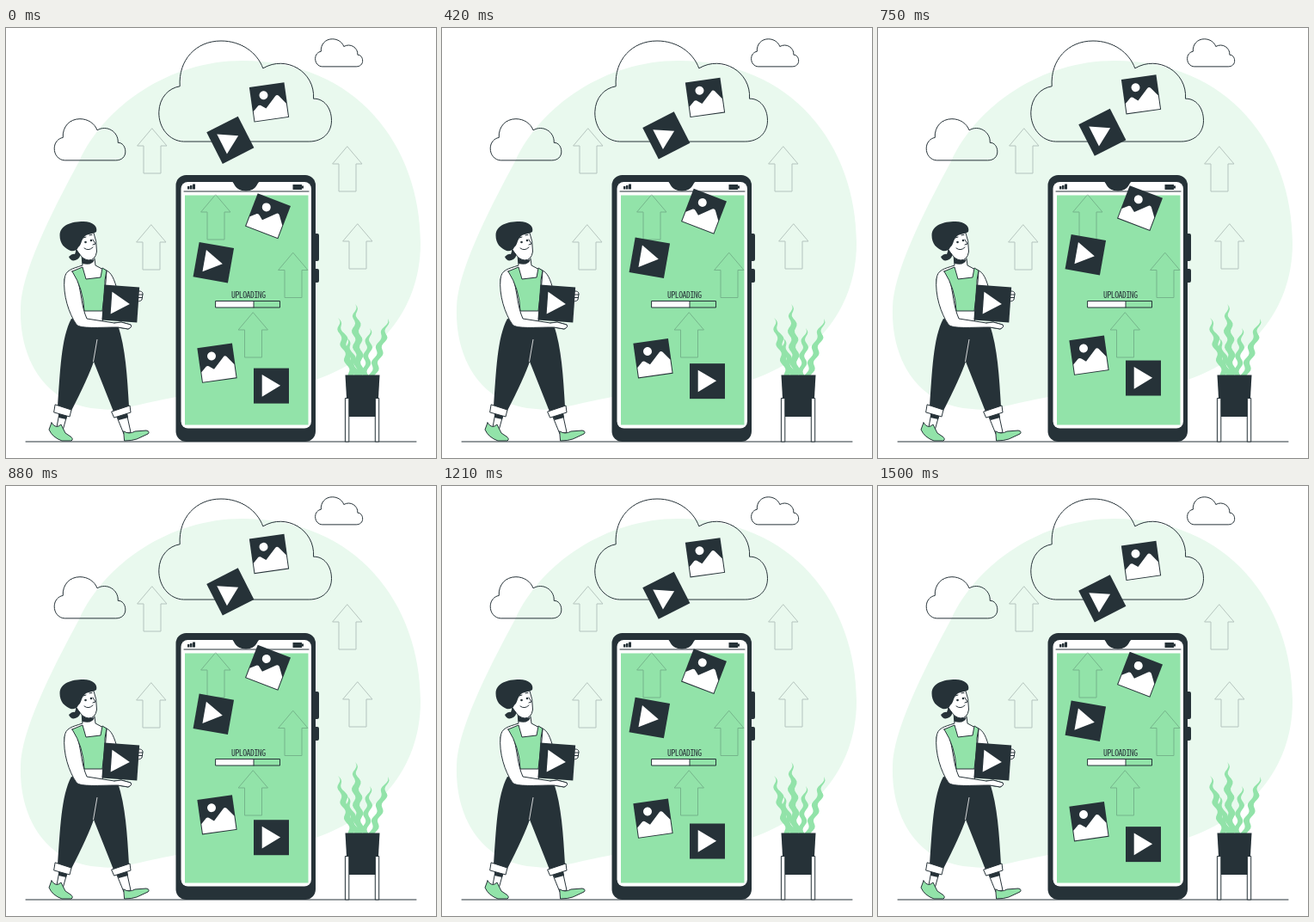
An HTML page that plays this animation: 500 by 500 pixels, repeating every 1540 ms.

```html
<!DOCTYPE html>
<html lang="en">
<head>
<meta charset="utf-8">
<title>Uploading</title>
<style>
  html, body { margin: 0; width: 100%; height: 100%; overflow: hidden; background: #fff; }
  svg { display: block; width: 100vw; height: 100vh; }
  .dark { fill: #263238; }
  .green { fill: #92e3a9; }
  .white { fill: #fff; }
  .line { stroke: #263238; stroke-linejoin: round; stroke-linecap: round; }
  .open { fill: none; }
  #cloud { vector-effect: non-scaling-stroke; }
  .label { font: 9.6px "Noto Sans Mono CJK JP", "Liberation Mono", monospace; letter-spacing: -.4px; }
</style>
</head>
<body>
<svg viewBox="0 0 500 500">
  <defs>
    <path id="cloud" d="M29 117.5C13 117 0 102 .5 83C1 66 12 55 25 53C23 22 44 0 73 0C96 0 115 13 122 32C149 16 183 36 181 67.500C193 67 202 78 202 93C202 107 192 117.5 176 117.5Z"/>
    <path id="arrow" d="M0 0L17 20H10V52H-10V20H-17Z"/>
    <g id="video">
      <rect class="dark" x="-20.5" y="-20.5" width="41" height="41"/>
      <path class="white" d="M-10.8-13V12.7L10.6-.3Z"/>
    </g>
    <g id="photo">
      <rect class="dark" x="-20.5" y="-20.5" width="41" height="41"/>
      <circle class="white" cx="-5.3" cy="-9" r="5"/>
      <path class="white" d="M-19.5 8L-13 2Q-11 1-9 3L-4.5 6.5L8-6Q10-8 12-6L19.5 4V19.5H-19.5Z"/>
    </g>
  </defs>

  <path fill="#e9f9ee" d="M17 325C18 285 50 220 85 155C115 90 190 38 275 38C408 38 482 138 482 250C482 330 430 385 360 409C300 425 250 420 198 429C150 438 130 446 110 443C50 440 15 390 17 325Z"/>
  <g class="line open">
    <use href="#cloud" transform="translate(177.3 15) scale(.996)"/>
    <use href="#cloud" transform="translate(56 105.7) scale(.41)"/>
    <use href="#cloud" transform="translate(359.5 12.8) scale(.273)"/>
    <path d="M23 481H477"/>
  </g>

  <g id="phone">
    <path class="dark" d="M358 239H362Q364 239 364 241V269Q364 271 362 271H358ZM358 280H362Q364 280 364 282V294Q364 296 362 296H358Z"/>
    <rect class="dark" x="197.5" y="171" width="162.5" height="310" rx="12"/>
    <rect class="white" x="203.5" y="179" width="151.5" height="286.5" rx="8"/>
    <rect class="green" x="208" y="194.5" width="143.5" height="267"/>
    <path class="line" d="M207 190H352"/>
    <path class="dark" d="M262 178C266 179 265 189 279 189.5C293 189 291 179 296 178Z"/>
    <path class="dark" d="M211 184H213.5V187.5H211ZM214 183H216.5V187.5H214ZM217 181.5H220V187.5H217ZM333.5 182H344V183.5H346V186.5H344V188H333.5Z"/>
    <text class="dark label" x="262" y="314">UPLOADING</text>
    <rect class="white" x="244" y="317.5" width="44" height="7.5"/>
    <path class="line open" d="M244 317.5H318.5V325H244ZM288 317.5V325"/>
  </g>
  <g id="arrows" class="line open" opacity=".26"></g>

  <g id="plant">
    <g id="leaves" class="green"></g>
    <path class="dark" d="M394.5 403.5H434.5L433 430L430 452H399L396 430Z"/>
    <path class="white line" d="M394.8 430.5H398.8V481H394.8ZM429.7 430.5H433.7V481H429.7Z"/>
  </g>

  <g id="woman">
    <g class="line white">
      <path d="M62 448L59 464L66 468L71 450ZM128 450L137 472L145 470L140 447Z"/>
      <path d="M113 281C121 281 125 290 128 300L124 318H112Z"/>
      <path d="M88 264L89 276C77 280 69 281 68 292C68 310 74 327 80 340L112 344L117 283L104 276L103 268Z"/>
    </g>
    <path class="dark" d="M61 449H72L70 455L61 453ZM128 450L141 447L142 453L131 456Z"/>
    <path class="dark" d="M76 338C64 360 63 400 60 440L76 445Q95 408 102 388L125 446L143 440C141 405 139 372 130 345Z"/>
    <path fill="none" stroke="#fff" stroke-width=".8" d="M106 362L101.5 388"/>
    <g class="line white">
      <path d="M57.5 438L76 444L74 452L56 447ZM123 446L144 439L145 447L126 453Z"/>
      <path d="M150 307C155 305 159 306 159 309L158 316Q155 319 150 317ZM153 310H159M153 313.5H158.5"/>
    </g>
    <g class="line green">
      <path d="M53 459L50 467Q54 476 65 480H76Q79 478 75 475L69 471L64 461Q58 467 53 459Z"/>
      <path d="M137 469Q143 473 150 469L163 468Q168 469 165 472L152 478Q146 480 138 480Z"/>
    </g>
    <path class="white line" d="M68 292C66 310 73 332 82 345C87 350 108 348 130 348L142 350Q147 348 145 345L134 342L126 343L94 338C87 322 88 307 82 288"/>
    <path class="green line" d="M77 283L89 278L93 292L110 290L112 279L117 282Q114 294 115 303L112 329H91Q90 303 77 283Z"/>
    <use href="#video" transform="translate(133.3 320.5) rotate(4)"/>
    <path class="white line" d="M126 343L134 342L145 345Q147 348 142 350L130 348"/>
    <path class="dark" d="M88 266Q95 271 103 269Q100 277 89 274Z"/>
    <path class="white line" d="M82 252Q86 236 101 235Q106 248 105.5 260Q104 270 96 270Q89 269 85 262Q80 262 82 252Z"/>
    <path class="dark" d="M62.5 241C63 229 76 225 90 225C101 225 107 231 105 237C100 240 94 239 91 243C87 247 88 252 84 255C83 258 79 260 75 259C68 256 62.5 251 62.5 241ZM73 266Q77 262 80 263L82 257L86 263Q87 266 83 269Q76 273 73 266Z"/>
    <path class="line open" d="M91 256Q96 260 101 255M101 246L104 251L101 252M90 244L93 243M97 241L100 240.5"/>
    <circle class="dark" cx="92.5" cy="249" r="1.3"/>
    <circle class="dark" cx="99" cy="247" r="1.3"/>
  </g>

  <g id="floating">
    <use href="#photo" transform="translate(306 87) rotate(-8)"/>
    <use href="#video" transform="translate(260.8 130.9) rotate(-27)"/>
    <use href="#photo" transform="translate(304.5 219.3) rotate(21)"/>
    <use href="#video" transform="translate(241.3 273.3) rotate(10)"/>
    <use href="#photo" transform="translate(245.5 390.3) rotate(-8)"/>
    <use href="#video" transform="translate(308.5 416.7)"/>
  </g>
</svg>
<script>
  const byId = id => document.getElementById(id);

  const arrowTips = [[170, 117], [169, 229], [397, 138], [409, 228], [244, 194], [334, 261.5], [287.5, 331]];
  byId('arrows').innerHTML = arrowTips
    .map(([x, y]) => `<use href="#arrow" x="${x}" y="${y}"/>`).join('');

  // A wavy blade that widens from its tip towards the pot.
  function leaf(tipX, tipY, baseX, width) {
    const left = [], right = [], steps = 30, length = 405 - tipY;
    for (let i = 0; i <= steps; i++) {
      const u = i / steps;
      const x = tipX + (baseX - tipX) * u + 2 * Math.sin(u * length / 2.9);
      const half = width / 2 * Math.min(1, u * 3);
      const y = (tipY + length * u).toFixed(1);
      left.push(`${(x - half).toFixed(1)} ${y}`);
      right.unshift(`${(x + half).toFixed(1)} ${y}`);
    }
    return `<path d="M${left.concat(right).join('L')}Z"/>`;
  }
  const leaves = [[386, 337, 403, 7], [396, 360, 407, 6], [406, 321, 411, 8], [423, 349, 418, 6], [444, 338, 426, 7]];
  byId('leaves').innerHTML = leaves.map(args => leaf(...args)).join('');

  const PERIOD = 1540, LEAD = 45, RISE = 10;
  const floating = byId('floating');
  function draw() {
    const phase = (performance.now() + LEAD) % PERIOD / PERIOD;
    const lift = RISE * (1 - Math.abs(1 - 2 * phase));
    floating.setAttribute('transform', `translate(0 ${-lift})`);
    requestAnimationFrame(draw);
  }
  draw();
</script>
</body>
</html>
```
